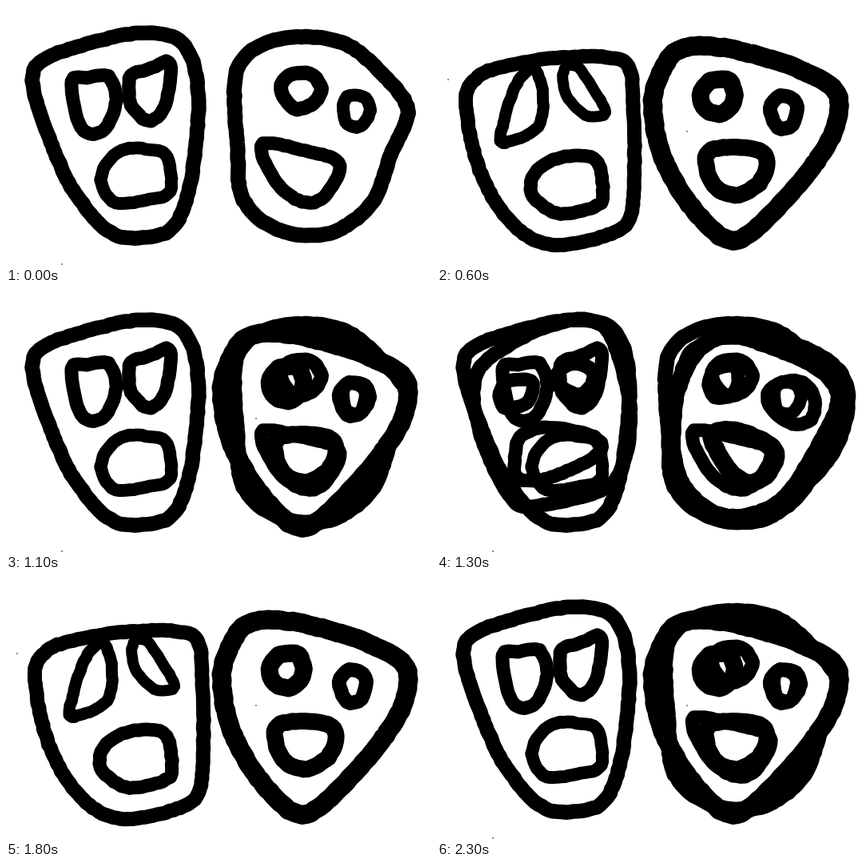
An HTML page that plays this animation: 532x324 px, repeating every 2400 ms.

```html
<!DOCTYPE html>
<html lang="en">
<head>
<meta charset="utf-8">
<title>Two faces</title>
<style>
html, body { margin: 0; width: 100%; height: 100%; overflow: hidden; background: #fff; }
svg { display: block; width: 532px; height: 324px; }
path { fill: none; stroke: #000; stroke-linejoin: round; }
</style>
</head>
<body>
<svg id="stage" viewBox="0 0 532 324"></svg>
<script>
const STEP = 100;
// One drawing per step; each step shows its own drawing and the next one inked together.
const LEFT = "AABBDDCCDDBA";
const RIGHT = "PPRQPRQQPRQQ";

const stage = document.getElementById("stage");
const layers = {};

const add = (parent, tag, attrs) => {
  const el = document.createElementNS("http://www.w3.org/2000/svg", tag);
  for (const key in attrs) el.setAttribute(key, attrs[key]);
  return parent.appendChild(el);
};
const layer = name => layers[name] ??= add(stage, "g", {});

let seed = 7;
const rough = () => {
  seed = (seed * 16807) % 2147483647;
  return (seed / 2147483647 - 0.5) * 1.2;
};

// Closed Catmull-Rom curve, slightly shaken to give a marker edge.
function curve(text) {
  const pts = text.split(" ").map(p => p.split(",").map(Number));
  const n = pts.length, out = [];
  pts.forEach((b, i) => {
    const a = pts[(i + n - 1) % n], c = pts[(i + 1) % n], d = pts[(i + 2) % n];
    const parts = Math.max(2, Math.round(Math.hypot(c[0] - b[0], c[1] - b[1]) / 5));
    for (let k = 0; k < parts; k++) {
      const t = k / parts;
      out.push([0, 1].map(j => (b[j] + 0.5 * t * (c[j] - a[j] +
        t * (2 * a[j] - 5 * b[j] + 4 * c[j] - d[j] +
        t * (3 * (b[j] - c[j]) + d[j] - a[j]))) + rough()).toFixed(1)).join(" "));
    }
  });
  return "M" + out.join("L") + "Z";
}

const ring = (name, width, text) =>
  add(layer(name), "path", { d: curve(text), "stroke-width": width });
const speck = (name, cx, cy) => add(layer(name), "circle", { cx, cy, r: 0.8 });

// Left faces: head, eyes, mouth
ring("A", 18.5, "35,80 57,62 110,45 165,34 212,40 234,70 241,130 231,220 212,273 180,289 130,283 84,230 56,170 36,112");
ring("A", 17, "82,94 102,90 128,88 138,118 125,152 106,160 90,145");
ring("A", 17, "157,86 182,78 204,70 205,95 197,130 178,144 157,125 154,100");
ring("A", 16, "127,195 149,179 175,179 200,186 207,220 202,236 175,243 137,246 119,222");
speck("A", 70, 323);

ring("B", 18, "46,118 58,88 104,57 147,39 185,33 213,47 232,95 242,150 236,205 219,238 180,255 115,267 92,255 65,205 49,155");
ring("B", 17, "78,125 88,111 108,108 120,113 116,134 100,143 83,143");
ring("B", 18, "148,108 160,91 176,88 194,97 194,115 179,127 158,120");
ring("B", 17, "98,200 104,180 128,169 165,171 200,182 205,198 175,217 130,234 100,230");
speck("B", 174, 288);

ring("C", 18, "36,118 52,88 90,74 150,65 210,64 240,76 246,130 247,200 243,260 222,283 165,298 120,292 80,255 50,195");
ring("C", 15, "122,78 132,105 131,140 118,158 82,171 82,150 95,108 108,86");
ring("C", 14, "160,78 176,76 196,104 211,133 190,138 167,120 158,98");
ring("C", 17, "117,225 126,205 150,191 180,187 201,195 208,235 200,250 155,260 124,243");
speck("C", 14, 92);

ring("D", 20, "22,105 28,82 65,56 118,44 190,35 240,45 266,85 264,140 254,205 222,262 186,297 140,273 92,242 45,172");
ring("D", 20, "88,110 122,92 158,95 155,125 125,146 90,142");
ring("D", 17, "195,100 208,84 224,92 224,115 208,126 196,118");
ring("D", 20, "124,197 150,175 200,175 208,228 168,211 128,218");

// Right faces
ring("P", 19, "286,100 298,65 335,43 385,39 430,50 470,84 503,130 482,185 460,243 420,278 375,287 325,272 295,238 290,185");
ring("P", 18, "344,104 355,87 380,85 395,103 383,123 360,128");
ring("P", 16, "422,130 427,114 447,113 456,130 445,150 428,148");
ring("P", 17, "319,175 335,172 370,180 412,192 416,211 395,241 370,245 345,228 327,202");

ring("Q", 24, "270,125 282,80 305,54 350,51 405,63 455,80 498,105 501,142 480,187 430,248 375,293 330,265 285,195");
ring("Q", 22, "330,112 342,94 366,94 372,116 358,134 337,130");
ring("Q", 18, "417,128 430,112 450,122 445,148 427,152");
ring("Q", 21, "340,182 375,177 411,186 406,218 378,236 350,228 338,205");
speck("Q", 313, 157);

// This head is two overlapping strokes, thick on the right
ring("R", 20, "294,150 312,95 335,65 370,54 440,63 495,90 514,130 500,190 460,240 405,281 345,280 308,243 294,190");
ring("R", 20, "298,140 311,88 330,66 370,54 425,70 478,95 503,130 478,190 430,260 370,280 325,260 298,215");
ring("R", 17, "340,115 348,96 372,92 377,110 368,128 348,130");
ring("R", 17, "414,125 432,112 458,112 473,134 468,158 446,164 420,146");
ring("R", 22, "345,176 378,173 422,195 415,225 392,238 370,226 352,200");

function draw(now) {
  const i = Math.floor(now / STEP) % LEFT.length;
  const j = (i + 1) % LEFT.length;
  const shown = LEFT[i] + LEFT[j] + RIGHT[i] + RIGHT[j];
  for (const name in layers)
    layers[name].style.display = shown.includes(name) ? "" : "none";
}

let start;
function loop(now) {
  start ??= now;
  draw(now - start);
  requestAnimationFrame(loop);
}
draw(0);
requestAnimationFrame(loop);
</script>
</body>
</html>
```
